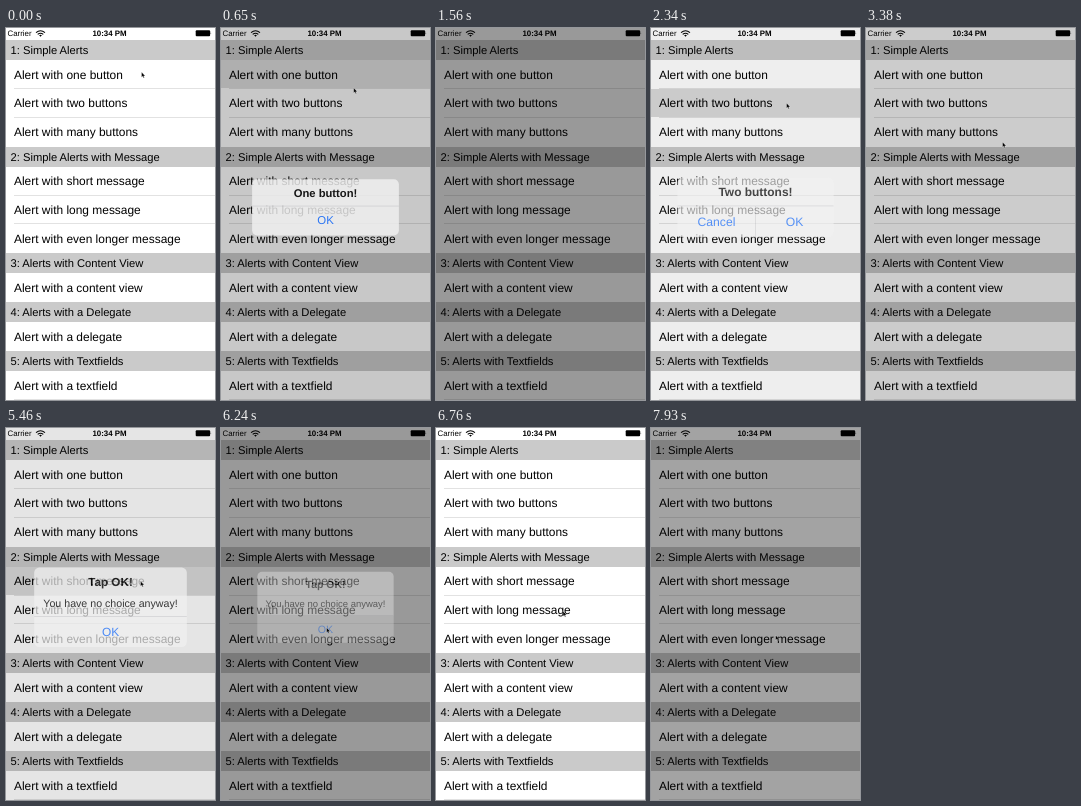
Recreate the animation shown at these times as an HTML page. Size 209 px wide and 372 px high, loop 8 s.

```html
<!DOCTYPE html>
<html lang="en">
<head>
<meta charset="utf-8">
<title>Alert list</title>
<style>
  html, body { margin: 0; width: 100%; height: 100%; overflow: hidden; background: #fff; }
  svg { display: block; width: 209px; height: 372px; }
  text { font-family: "Liberation Sans", Arial, sans-serif; fill: #000; text-rendering: geometricPrecision; }
  .mid { text-anchor: middle; }
  .row { font-size: 11.95px; }
  .head { font-size: 11.2px; }
  .status { font-size: 7.9px; }
  .title { font-size: 11.1px; font-weight: bold; }
  .msg { font-size: 10.1px; }
  .btn { font-size: 11.3px; fill: #176bfa; }
</style>
</head>
<body>
<svg id="stage" viewBox="0 0 209 372">
  <rect width="209" height="372" fill="#fff"/>
  <text class="status" x="1.5" y="8.2">Carrier</text>
  <g fill="none" stroke="#000" stroke-width="1.1">
    <path d="M30 4.6Q34.5 0.9 39 4.6M31.7 6.4Q34.5 4 37.3 6.4"/>
    <path d="M33.1 7.2L34.5 8.8L35.9 7.2Q34.5 6.2 33.1 7.2Z" fill="#000" stroke="none"/>
  </g>
  <text class="status mid" x="103.5" y="8.2" font-weight="bold">10:34 PM</text>
  <rect x="189.7" y="2.2" width="14.4" height="6" rx="1"/>
  <path d="M204.6 4.2q1.2 1 0 2z"/>
  <g id="list"></g>
  <rect id="dim" width="209" height="372" opacity="0"/>
  <g id="alerts"></g>
  <path id="cursor" d="M0 0V5.2L1.2 4.2L2 6L2.9 5.6L2.1 3.9H3.7Z" stroke="#fff" stroke-width=".35"/>
</svg>
<script>
const LOOP = 8000, STEP = 130;
const ROW = 28.75, HEAD = 20.25, WIDTH = 145, BTN = 29, MID_X = 104.5, MID_Y = 179.3;
const $ = id => document.getElementById(id);

function add(parent, tag, attrs, text) {
  const el = document.createElementNS("http://www.w3.org/2000/svg", tag);
  for (const k in attrs) el.setAttribute(k, attrs[k]);
  if (text) el.textContent = text;
  parent.appendChild(el);
  return el;
}

const sections = [
  ["Simple Alerts", "one button", "two buttons", "many buttons"],
  ["Simple Alerts with Message", "short message", "long message", "even longer message"],
  ["Alerts with Content View", "a content view"],
  ["Alerts with a Delegate", "a delegate"],
  ["Alerts with Textfields", "a textfield"]
];
const rowFaces = [];

function buildList() {
  const list = $("list");
  let y = 12;
  sections.forEach(([name, ...rows], i) => {
    const top = Math.round(y);
    add(list, "rect", { x: 0, y: top, width: 209, height: 20, fill: "#cacaca" });
    add(list, "text", { class: "head", x: 4.5, y: top + 14 }, `${i + 1}: ${name}`);
    y += HEAD;
    rows.forEach((row, j) => {
      const face = add(list, "rect", { x: 0, y: Math.round(y), width: 209, height: 28, fill: "#d9d9d9", opacity: 0 });
      rowFaces.push(face);
      add(list, "text", { class: "row", x: 8, y: Math.round(y + ROW / 2) + 4 }, "Alert with " + row);
      y += ROW;
      if (j < rows.length - 1 || i === sections.length - 1)
        add(list, "rect", { x: 8, y: Math.round(y) - 1, width: 201, height: 1, fill: "#e2e2e2" });
    });
  });
}

// show / press / hide are times in ms; hit is the index of the pressed button
const alerts = [
  { title: "One button!", lines: [], buttons: ["OK"], hit: 0, show: 400, press: 1290, hide: 1380 },
  { title: "Two buttons!", lines: [], buttons: ["Cancel", "OK"], side: true, hit: 1, show: 2200, press: 2940, hide: 3030 },
  { title: "Many buttons!", lines: [], buttons: ["One", "Two", "Three", "Four"], hit: 0, show: 3740, press: 4600, hide: 4730 },
  { title: "Tap OK!", lines: ["You have no choice anyway!"], buttons: ["OK"], hit: 0, show: 5290, press: 6110, hide: 6150 },
  { title: "Long message!", lines: ["This message is so long", "that it needs a few more", "lines to fit in here."], buttons: ["OK"], hit: 0, show: 6860, press: 7620, hide: 7700 }
];

function buildAlert(a) {
  const lines = a.lines.length;
  const body = 26.5 + (lines ? 20 + (lines - 1) * 12 : 0);
  const h = body + (a.side ? 1 : a.buttons.length) * BTN;
  const top = -h / 2, left = -WIDTH / 2;
  const g = a.el = add($("alerts"), "g", {});
  add(g, "rect", { x: left, y: top, width: WIDTH, height: h, rx: 5, fill: "#f2f2f2", "fill-opacity": .93 });
  add(g, "text", { class: "title mid", x: 0, y: top + 17.6 }, a.title);
  a.lines.forEach((s, i) => add(g, "text", { class: "msg mid", x: 0, y: top + 37 + i * 12 }, s));
  a.buttons.forEach((s, i) => {
    const w = a.side ? WIDTH / 2 : WIDTH;
    const x = a.side ? left + i * w : left;
    const y = top + body + (a.side ? 0 : i * BTN);
    const face = add(g, "rect", { x, y, width: w, height: BTN, opacity: 0 });
    if (i === a.hit) a.face = face;
    add(g, "rect", { x, y: y - .3, width: w, height: .6, fill: "#c4c4c8" });
    if (a.side && i) add(g, "rect", { x: x - .3, y, width: .6, height: BTN, fill: "#c4c4c8" });
    add(g, "text", { class: "btn mid", x: x + w / 2, y: y + 18.2 }, s);
  });
}

// time, x, y of the pointer tip
const path = [
  [0, 135.5, 44], [520, 135.5, 44], [1170, 108, 196], [1430, 108, 196],
  [2020, 135.5, 75], [2340, 135.5, 75], [2800, 138, 194], [3080, 138, 194],
  [3380, 136.5, 114], [3560, 136, 104], [3900, 136, 104], [4420, 127, 145],
  [4780, 127, 145], [5160, 134.5, 153], [5480, 134.5, 153], [5840, 105, 200],
  [6200, 105, 200], [6630, 127, 183], [7020, 127, 183], [7480, 124.5, 207], [8000, 124.5, 207]
];

const clamp = v => Math.max(0, Math.min(1, v));

function pointer(t) {
  let i = 1;
  while (i < path.length - 1 && path[i][0] < t) i++;
  const [t0, x0, y0] = path[i - 1], [t1, x1, y1] = path[i];
  const p = clamp((t - t0) / (t1 - t0)), e = p * p * (3 - 2 * p);
  return [x0 + (x1 - x0) * e, y0 + (y1 - y0) * e];
}

function draw(t) {
  let dim = 0;
  alerts.forEach((a, i) => {
    const q = clamp((t - a.show) / 340);
    const out = clamp((t - a.hide) / 150);
    const fade = clamp((t - a.hide - 200) / 300);
    dim = Math.max(dim, .4 * q * q * (1 - fade));
    const scale = (1 + .26 * (1 - q) ** 2.3) * (1 - .1 * out);
    a.el.setAttribute("opacity", q ** .4 * (1 - out));
    a.el.setAttribute("transform", `translate(${MID_X} ${MID_Y}) scale(${scale})`);
    a.face.setAttribute("opacity", t >= a.press ? .1 : 0);
    // the tapped row stays grey until its alert has opened
    const tapped = t >= a.show - 90 ? 1 - clamp((t - a.show - 200) / 300) : 0;
    rowFaces[i].setAttribute("opacity", tapped);
  });
  $("dim").setAttribute("opacity", dim);
  const [x, y] = pointer(t);
  $("cursor").setAttribute("transform", `translate(${x} ${y})`);
  $("cursor").setAttribute("opacity", t > 1500 && t < 1650 ? 0 : 1);
}

buildList();
alerts.forEach(buildAlert);
const start = performance.now();
function tick() {
  const t = (performance.now() - start) % LOOP;
  draw(Math.floor(t / STEP) * STEP);
  requestAnimationFrame(tick);
}
tick();
</script>
</body>
</html>
```
